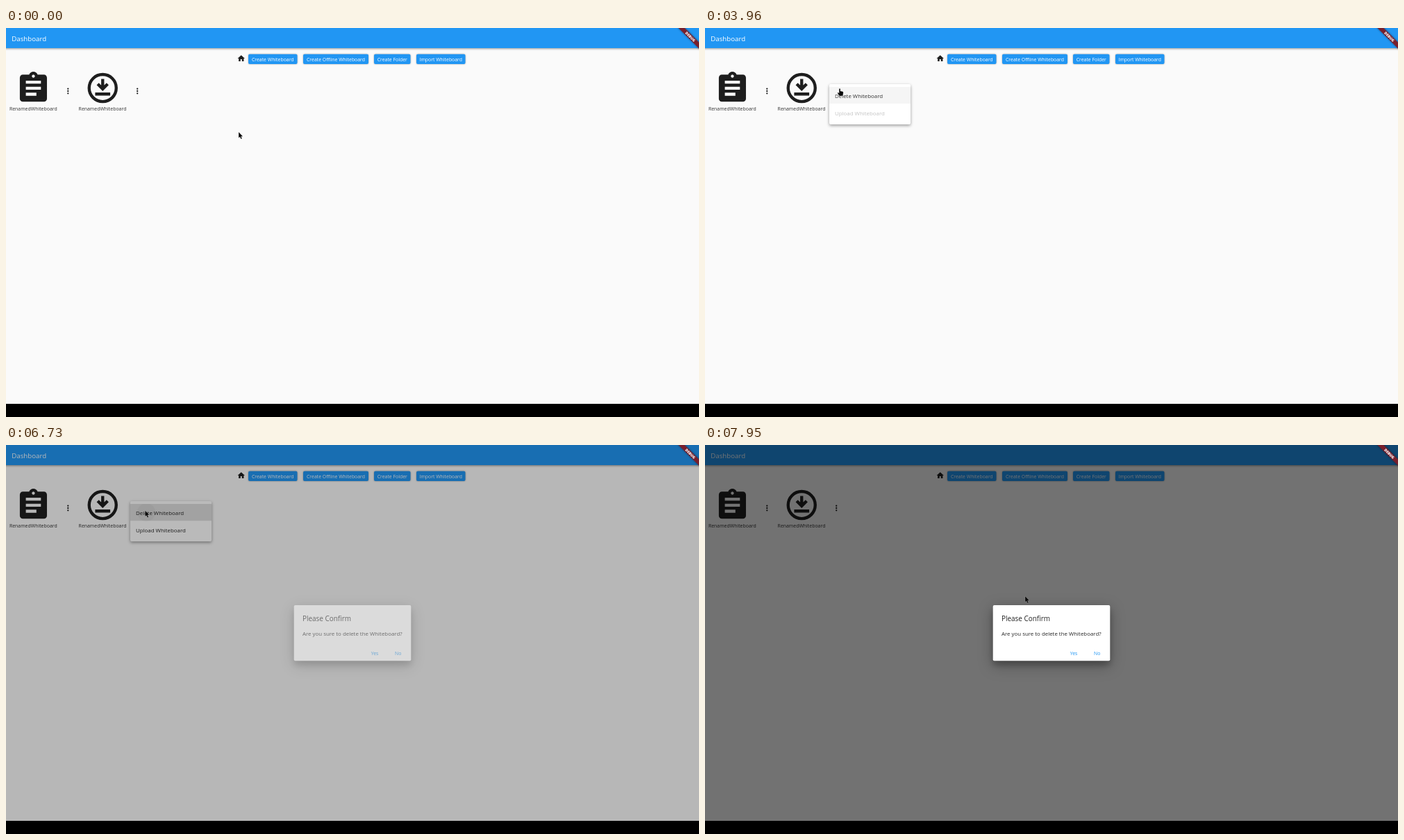
Write an HTML page that moves like this. It is 998 by 561 pixels and loops after 8 s.

```html
<!DOCTYPE html>
<html lang="en">
<head>
<meta charset="utf-8">
<title>Dashboard</title>
<style>
  html, body { margin: 0; width: 100%; height: 100%; overflow: hidden; background: #fafafa; }
  svg { display: block; width: 998px; height: 561px; }
  text { font-family: "Open Sans", "Noto Sans", sans-serif; white-space: pre; }
  .title { font-size: 9.7px; font-weight: 500; fill: #fff; }
  .btn rect { fill: #2196f3; filter: drop-shadow(0 .8px .8px rgba(0,0,0,.35)); }
  .btn text { font-size: 6.9px; font-weight: 500; fill: #fff; }
  .label { font-size: 6.93px; fill: #333; text-anchor: middle; }
  .item { font-size: 7.9px; fill: #262626; }
  .head { font-size: 9.93px; fill: #212121; }
  .action { font-size: 6.9px; font-weight: 500; fill: #2196f3; text-anchor: middle; }
  .debug { font-size: 5.2px; font-weight: 800; fill: #fff; text-anchor: middle; }
  .bar { filter: drop-shadow(0 1px 1.5px rgba(0,0,0,.4)); }
  .sheet { filter: drop-shadow(0 2px 2px rgba(0,0,0,.26)) drop-shadow(0 1px 2px rgba(0,0,0,.14)); }
  .dialog { filter: drop-shadow(0 6px 4px rgba(0,0,0,.22)) drop-shadow(0 5px 10px rgba(0,0,0,.3)); }
  .ribbon { filter: drop-shadow(0 0 1.6px rgba(0,0,0,.5)); }
</style>
</head>
<body>
<svg viewBox="0 0 998 561">
  <defs>
    <clipPath id="row"><rect x="179" y="85" width="117" height="24.5"/></clipPath>
    <g id="dots" fill="#1e1e1e">
      <circle cy="-3.3" r="1.15"/><circle r="1.15"/><circle cy="3.3" r="1.15"/>
    </g>
  </defs>

  <rect width="998" height="561" fill="#fafafa"/>
  <rect class="bar" x="-5" y="-5" width="1008" height="34" fill="#2196f3"/>
  <text class="title" x="8.3" y="18.6">Dashboard</text>

  <path transform="translate(332.5 37.7) scale(.52)" fill="#1e1e1e" d="M10 20v-6h4v6h5v-8h3L12 3 2 12h3v8z"/>
  <g id="buttons"></g>

  <g fill="#1e1e1e">
    <path transform="translate(13.4 60.8) scale(2.17)" d="M19 3h-4.18C14.4 1.84 13.3 1 12 1s-2.4.84-2.82 2H5c-1.1 0-2 .9-2 2v14c0 1.1.9 2 2 2h14c1.1 0 2-.9 2-2V5c0-1.1-.9-2-2-2zm-7 0c.55 0 1 .45 1 1s-.45 1-1 1-1-.45-1-1 .45-1 1-1zm2 14H7v-2h7v2zm3-4H7v-2h10v2zm0-4H7V7h10v2z"/>
    <g transform="translate(113.2 60.5) scale(2.17)">
      <circle cx="12" cy="12" r="9" fill="none" stroke="#1e1e1e" stroke-width="2"/>
      <path d="M14.59 8.59 13 10.17V6h-2v4.17L9.41 8.59 8 10l4 4 4-4zM7 15h10v2H7z"/>
    </g>
  </g>
  <text class="label" x="39.3" y="119.4">RenamedWhiteboard</text>
  <text class="label" x="139" y="119.4">RenamedWhiteboard</text>
  <circle id="hover" cx="189" cy="91" r="18" fill="#000" fill-opacity=".04"/>
  <use href="#dots" x="89.3" y="91"/>
  <use href="#dots" x="189.2" y="91"/>

  <g id="menu">
    <rect id="sheet" class="sheet" x="179" y="81" rx="2" fill="#fff"/>
    <g id="first">
      <g clip-path="url(#row)">
        <rect x="179" y="85" width="117" height="24.5" fill="#000" fill-opacity=".045"/>
        <rect id="press" x="179" y="85" width="117" height="24.5" fill="#bcbcbc"/>
        <circle id="splash" cx="202" cy="97" fill="#c8c8c8" fill-opacity=".4"/>
      </g>
      <text class="item" x="187" y="100.7">Delete Whiteboard</text>
    </g>
    <text id="second" class="item" x="187" y="125.6">Upload Whiteboard</text>
  </g>

  <rect id="shade" width="998" height="542" fill="#000"/>
  <g id="dialog">
    <rect class="dialog" x="414.7" y="231" width="168.6" height="80.3" rx="2" fill="#fff"/>
    <text class="head" x="427" y="254">Please Confirm</text>
    <text class="item" x="427" y="274.7">Are you sure to delete the Whiteboard?</text>
    <text class="action" x="531" y="302.7">Yes</text>
    <text class="action" x="564.7" y="302.7">No</text>
  </g>

  <g transform="translate(998 0) rotate(45)">
    <rect class="ribbon" x="-22" y="14.6" width="44" height="6.24" fill="#791f2c"/>
    <text class="debug" y="19.6">DEBUG</text>
  </g>
  <rect y="542" width="998" height="19" fill="#000"/>

  <g id="cursor" stroke="#fff" stroke-opacity=".45" stroke-width=".4" fill="#0a0a0a">
    <path id="arrow" d="M0 0V8.6L1.9 7 3.3 10.1 4.9 9.4 3.5 6.4 6 6.2z"/>
    <path id="hand" d="M-.9.8Q0-.5.9.8V4L4 4.6Q5.4 5 5.2 6.5L4.4 10.8H-.6L-3 7.2Q-3.4 6-2.2 6L-.9 7z"/>
  </g>
</svg>
<script>
const LOOP = 8000;
const $ = id => document.getElementById(id);
const clamp = v => Math.max(0, Math.min(1, v));
const ramp = (t, from, to) => clamp((t - from) / (to - from));
const alpha = (id, v) => $(id).setAttribute('opacity', v.toFixed(3));

// Pointer path: time, x, y
const path = [
  [0, 335, 150], [620, 335, 150], [1420, 249, 108], [1600, 217, 89.5],
  [1660, 217, 89.5], [2100, 203, 91], [2210, 196, 92], [2310, 196, 92],
  [2460, 191, 95], [2630, 194, 93], [2780, 194, 93], [3120, 288, 104],
  [3560, 196, 89], [3680, 196, 89], [3900, 194, 87], [4570, 194, 87],
  [4900, 222, 95], [5200, 197, 91], [5460, 197, 91], [5760, 200, 94],
  [6680, 200, 94], [6780, 200.7, 95], [7350, 201, 95], [7670, 249, 110],
  [7770, 249, 110], [7950, 461, 218], [LOOP, 461, 218]
];

function pointer(t) {
  const i = Math.max(1, path.findIndex(k => k[0] > t));
  const [a, b] = [path[i - 1], path[i]];
  const p = ramp(t, a[0], b[0]);
  return [a[1] + (b[1] - a[1]) * p, a[2] + (b[2] - a[2]) * p];
}

const buttons = [
  [349, 70.5, 'Create Whiteboard'], [428, 94, 'Create Offline Whiteboard'],
  [530, 52.5, 'Create Folder'], [591, 70.5, 'Import Whiteboard']
];
$('buttons').innerHTML = buttons.map(([x, w, label]) =>
  `<g class="btn"><rect x="${x}" y="37.8" width="${w}" height="14.2" rx="2"/>` +
  `<text x="${x + w / 2}" y="47.5" text-anchor="middle">${label}</text></g>`).join('');

function drawMenu(t) {
  const p = ramp(t, 3755, 4055) * (1 - ramp(t, 6790, 7090));
  alpha('menu', clamp(p * 3));
  $('sheet').setAttribute('width', 117 * clamp(p / .286));
  $('sheet').setAttribute('height', 58 * clamp(p / .571));
  alpha('first', ramp(p, .286, .714));
  alpha('second', ramp(p, .571, 1));
  alpha('press', .4 * ramp(t, 5980, 6180));
  $('splash').setAttribute('r', 13 * ramp(t, 5980, 6680));
}

function draw(t) {
  const [x, y] = pointer(t);
  const open = t > 3755 && t < 6600;
  const over = t < 3755 && x > 176 && x < 202 && y > 78 && y < 104;
  const hand = open || over;
  $('cursor').setAttribute('transform', `translate(${x.toFixed(2)} ${y.toFixed(2)})`);
  alpha('hand', hand ? 1 : 0);
  alpha('arrow', hand ? 0 : 1);
  alpha('hover', over ? 1 : 0);
  drawMenu(t);
  const show = 1 - (1 - ramp(t, 6700, 6850)) ** 3;
  alpha('shade', .54 * show);
  alpha('dialog', show);
}

const start = performance.now();
function tick() {
  draw((performance.now() - start) % LOOP);
  requestAnimationFrame(tick);
}
tick();
</script>
</body>
</html>
```
